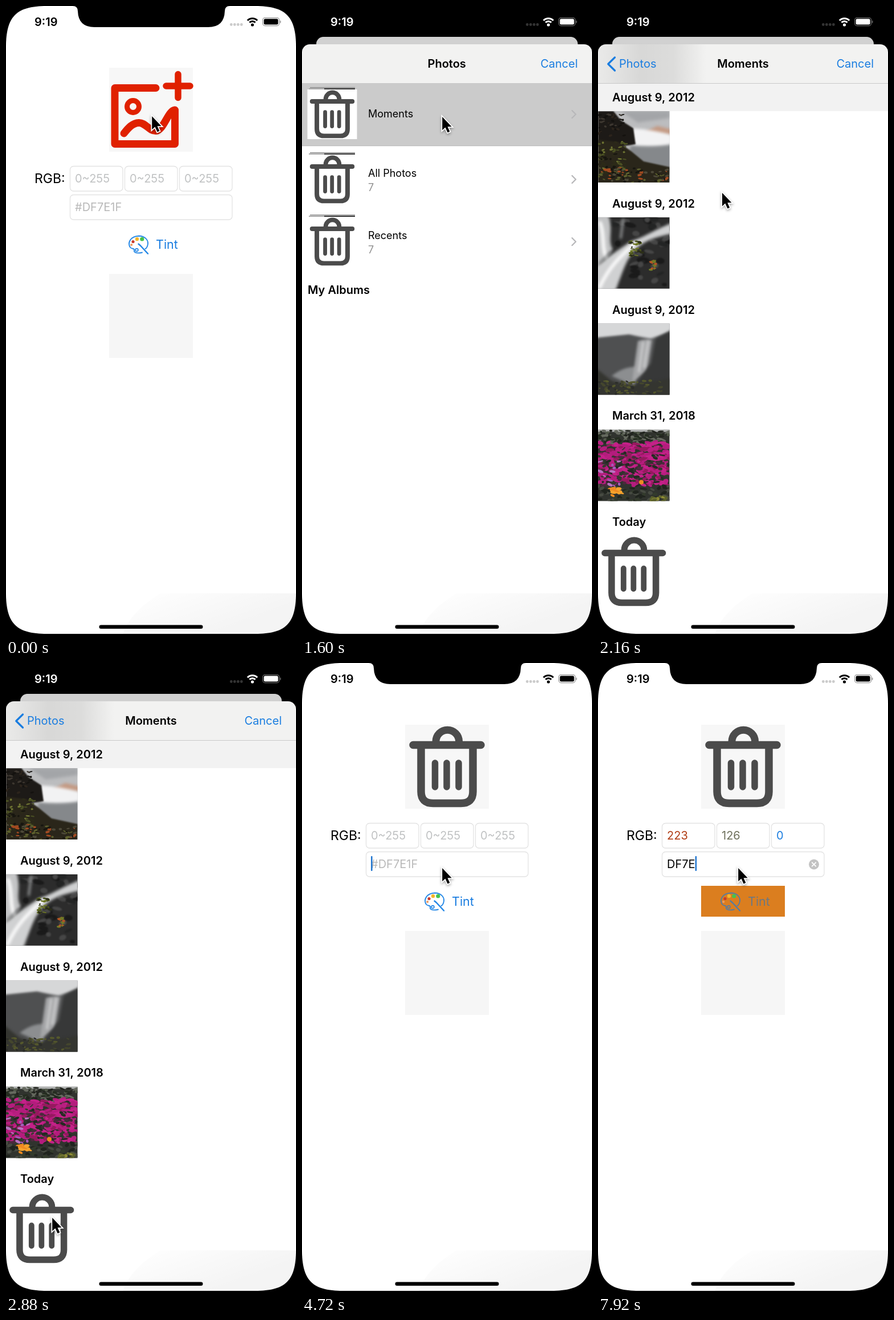
Recreate the animation shown at these times as an HTML page with a canvas. Size 509 by 1101 pixels, loop 8 s.

```html
<!DOCTYPE html>
<html lang="en">
<head>
<meta charset="utf-8">
<title>Tint picker</title>
<style>
html, body { margin: 0; width: 100%; height: 100%; overflow: hidden; background: #000; }
canvas { display: block; width: 509px; height: 1101px; }
</style>
</head>
<body>
<canvas id="stage"></canvas>
<script>
const W = 509, H = 1101, LOOP = 8000, STEP = 80;
const BLUE = '#1a7de0', INK = '#4b4b4b';
const OPEN = 240, PRESS = 1520, PUSH = 1655, CLOSE = 3200, FOCUS = 4560;
const KEYS = [[5440, 'D'], [6000, 'F'], [6720, '7'], [7440, 'E']];
const SHEET_TOP = 67;

const canvas = document.getElementById('stage');
const ratio = window.devicePixelRatio || 1;
canvas.width = Math.round(W * ratio);
canvas.height = Math.round(H * ratio);
const c = canvas.getContext('2d');

const clamp = v => Math.max(0, Math.min(1, v));
const mix = (a, b, k) => a + (b - a) * k;
const gray = v => `rgb(${Math.round(v)},${Math.round(v)},${Math.round(v)})`;
const smooth = v => { v = clamp(v); return v * v * (3 - 2 * v); };

function spring(ms) {
  if (ms <= 0) return 0;
  const x = ms * 0.0185, p = 1 - (1 + x) * Math.exp(-x);
  return p > 0.9985 ? 1 : p;
}

function within(x, y, draw, scale = 1) {
  c.save();
  c.translate(x, y);
  c.scale(scale, scale);
  draw();
  c.restore();
}

function box(x, y, w, h, fill, r = 0) {
  c.beginPath();
  c.roundRect(x, y, w, h, r);
  c.fillStyle = fill;
  c.fill();
}

function disc(x, y, r, fill) {
  c.beginPath();
  c.arc(x, y, r, 0, 7);
  c.fillStyle = fill;
  c.fill();
}

function line(path, color, width) {
  c.strokeStyle = color;
  c.lineWidth = width;
  c.lineCap = c.lineJoin = 'round';
  c.stroke(new Path2D(path));
}

function shape(path, fill) {
  c.fillStyle = fill;
  c.fill(new Path2D(path));
}

// y is the middle of the capital letters
function text(str, x, y, size, color = '#000', weight = 400, align = 'left') {
  c.font = `${weight} ${size}px Inter, Roboto, sans-serif`;
  c.textAlign = align;
  c.fillStyle = color;
  c.fillText(str, x, y + size * 0.364);
}

function screenPath() {
  const b = 1099, r = 72, k = 18;
  return new Path2D(`M0 ${r}C0 ${k} ${k} 0 ${r} 0H${W - r}C${W - k} 0 ${W} ${k} ${W} ${r}` +
    `V${b - r}C${W} ${b - k} ${W - k} ${b} ${W - r} ${b}H${r}C${k} ${b} 0 ${b - k} 0 ${b - r}Z`);
}

// Icons, in a 147 unit square
function trash() {
  line('M54 35V29.5A20.3 20.3 0 0 1 94.6 29.5V35', INK, 13);
  line('M14 35.5H133M28 35.5V117Q28 137.5 49 137.5H98Q119 137.5 119 117V35.5', INK, 13.5);
  line('M52.5 67V109M73 67V109M94 67V109', INK, 11.5);
}

function addPicture() {
  const red = '#e02100';
  line('M82 35.5H10V133.5H115.5V74C103 75 96 110 82 110.5C70 111 64 96 52 96.5C41 97 34 105 26 115', red, 13);
  line('M121 11.5V52.5M100 32H142', red, 11.5);
  c.beginPath();
  c.arc(42, 68, 10.5, 0, 7);
  c.strokeStyle = red;
  c.lineWidth = 9;
  c.stroke();
}

function palette(color) {
  line('M239 431.5C228 434 224 431 225 427C225.5 423.5 221 426 218 422.5' +
    'C213 415 218 403 233 402.5C245 402.5 251 411 248.5 419Q247 424 244.5 425', color, 1.9);
  disc(230, 408, 3.2, '#f4b62d');
  disc(238.8, 408, 3.6, '#47c34b');
  disc(223, 412.5, 2.6, '#c93a2b');
  disc(220.2, 418, 2.1, '#ee9a62');
  line('M232.5 416.5L236 419.5L249 433.5', color, 2.5);
  c.beginPath();
  c.arc(229.5, 427, 2.4, 0, 7);
  c.lineWidth = 1.7;
  c.stroke();
}

// Photos, in a 125 unit square
function random(seed) {
  return () => {
    seed = (seed + 0x6d2b79f5) | 0;
    let v = Math.imul(seed ^ seed >>> 15, 1 | seed);
    v = v + Math.imul(v ^ v >>> 7, 61 | v) ^ v;
    return ((v ^ v >>> 14) >>> 0) / 4294967296;
  };
}

function specks(seed, n, colors, x, y, w, h, r) {
  const rnd = random(seed);
  for (let i = 0; i < n; i++) {
    c.beginPath();
    c.ellipse(x + rnd() * w, y + rnd() * h, r * (0.5 + rnd()), r * (0.3 + rnd() * 0.4), rnd() - 0.5, 0, 7);
    c.fillStyle = colors[Math.floor(rnd() * colors.length)];
    c.fill();
  }
}

function soft(radius, draw) {
  c.filter = `blur(${radius * ratio}px)`;
  draw();
  c.filter = 'none';
}

const photos = [
  () => {
    box(0, 0, 126, 126, '#bcbdbf');
    soft(2.5, () => {
      shape('M40 0H126V12L70 20Z', '#a3a5a8');
      shape('M84 36L104 26L130 32V42H84Z', '#c39a84');
      shape('M60 30Q95 32 130 42V62H60Z', '#f2f2f3');
      shape('M58 60Q95 65 130 58V110H40Z', '#85888b');
    });
    soft(1, () => {
      shape('M0 0H27L40 16L62 30L66 58L40 62H0Z', '#1d1a17');
      shape('M0 50L36 54L58 70L80 88L126 98V126H0Z', '#2a261a');
    });
    specks(17, 35, ['#3d3730', '#14120f', '#2c241c'], 0, 4, 46, 42, 3);
    specks(7, 90, ['#6f7533', '#4b5123', '#17160f', '#2c2a18'], 0, 54, 50, 55, 3);
    specks(29, 80, ['#a34a20', '#5d602d', '#171610', '#4c4838'], 0, 99, 122, 26, 3);
  },
  () => {
    box(0, 0, 126, 126, '#2c2c2c');
    soft(1, () => specks(11, 50, ['#464646', '#1a1a1a', '#232424'], 20, 2, 105, 118, 8));
    soft(2.5, () => {
      shape('M-4 -4H18C28 22 16 40 26 56L-4 90Z', '#c4c5c6');
      shape('M130 10V29C92 36 76 45 60 62C46 82 40 106 30 130H-4V86C24 64 44 52 58 42C84 34 98 22 130 10Z', '#d0d1d2');
      line('M3 122C18 90 38 68 64 47M4 10C12 30 6 52 14 70', '#fafafa', 6);
      line('M44 4L40 36M3 80L22 62', '#8f9192', 4);
    });
    specks(23, 28, ['#6c7624', '#4a531e', '#2b2e18'], 56, 40, 22, 28, 3);
    specks(5, 12, ['#b65624', '#717a26'], 90, 76, 13, 18, 3);
  },
  () => {
    box(0, 0, 126, 126, '#58595a');
    soft(2, () => {
      shape('M-4 -4H130V14L92 27L55 20L-4 26Z', '#d6d7d8');
      shape('M-4 27L54 21L82 29L68 90L26 104L-4 84Z', '#4f5051');
      shape('M24 92Q46 74 72 76L64 110Z', '#8c8e90');
      shape('M70 31Q82 26 95 29L86 84L60 102Z', '#a5a6a8');
      line('M79 34L72 84M88 32L81 76', '#c9cacb', 4);
      shape('M130 11L101 27L93 70L67 104V130H130Z', '#373838');
      shape('M-4 78L25 101L62 108L130 96V130H-4Z', '#343530');
    });
    specks(13, 70, ['#55582c', '#2b2c28', '#44462d'], 0, 100, 112, 24, 3);
  },
  () => {
    box(0, 0, 126, 126, '#30332e');
    box(0, 0, 126, 4, '#b0b2b1');
    specks(3, 120, ['#252d21', '#525a4a', '#666a60', '#22251f'], 0, 2, 125, 24, 4);
    specks(19, 260, ['#b41c7d', '#c42188', '#96195f', '#b81f80'], 0, 22, 124, 76, 6);
    specks(31, 75, ['#333b2c', '#252923', '#4a2a3c'], 0, 40, 125, 62, 4);
    specks(37, 60, ['#333b2c', '#20241e', '#474b42'], 0, 98, 125, 27, 5);
    specks(43, 12, ['#a35cb8', '#b972c2'], 2, 53, 37, 48, 4);
    specks(47, 15, ['#f08b20', '#f6a32c'], 22, 102, 23, 14, 5);
    disc(76, 92, 4, '#ec8b22');
    specks(53, 15, ['#8e8c36', '#5b612c'], 92, 118, 32, 7, 4);
  }
];

function drawHome(t) {
  const typed = KEYS.filter(k => t >= k[0]).map(k => k[1]).join('');
  const rgb = [0, 2, 4].map(i => parseInt(typed.slice(i, i + 2), 16) || 0);
  const hint = '#c0c2c3';

  box(0, 0, W, H, '#fff');
  box(181, 108, 147, 147, '#f7f7f7');
  within(181, 108, t < CLOSE ? addPicture : trash);
  box(181, 469, 147, 147, '#f6f6f6');

  text('RGB:', 50, 302, 23);
  const field = (x, y, w) => {
    c.beginPath();
    c.roundRect(x + 0.5, y + 0.5, w - 1, 43.5, 6);
    c.strokeStyle = '#e3e3e3';
    c.lineWidth = 1.3;
    c.stroke();
  };
  ['#b03c14', '#6e705b', BLUE].forEach((color, i) => {
    const x = 112 + i * 96;
    field(x, 280, 93.5);
    text(typed ? String(rgb[i]) : '0~255', x + 9, 301.5, 20, typed ? color : hint);
  });

  field(112, 330, 285.5);
  text(typed || '#DF7E1F', 121, 352, 20, typed ? '#000' : '#b9b9b9');
  if (t >= FOCUS) {
    const last = KEYS.reduce((m, k) => t >= k[0] ? k[0] : m, FOCUS);
    const x = typed ? 121 + c.measureText(typed).width : 121;
    if ((t - last) % 1000 < 560) box(x, 338, 2.6, 26, '#2478d0', 1);
  }
  if (typed) {
    disc(379, 352.5, 9, '#c3c3c3');
    line('M375.8 349.3L382.2 355.7M382.2 349.3L375.8 355.7', '#fff', 1.8);
    box(181, 390, 147, 54, `rgb(${Math.max(0, rgb[0] - 4)},${rgb[1]},31)`);
  }
  palette(typed ? '#587c9e' : '#2387e6');
  text('Tint', 263, 417.5, 21.5, typed ? '#6e7880' : BLUE);
}

function drawList(pressed, q) {
  box(0, 68, W, H, '#fff');
  if (pressed) box(0, 68, W, 110, gray(mix(203, 223, q)));
  box(0, 177.3, W, 1, pressed ? '#b9b9b9' : '#d9d9d9');
  [['Moments', 79, 121], ['All Photos', 193, 225, '7'], ['Recents', 302, 334, '7']]
    .forEach(([name, top, mid, count]) => {
      box(9.5, top, 87, 87, '#fff');
      box(14, top - 4, 79, 1.5, '#8d8d8d');
      box(12, top - 2, 81, 2, '#aaa');
      box(39, top - 2, 54, 2, '#333');
      within(9.5, top, trash, 87 / 147);
      text(name, 116, mid, 18);
      if (count) text(count, 116, mid + 25, 18, '#929292');
      const y = top + 43.5;
      line(`M474 ${y - 6.5}L480.5 ${y}L474 ${y + 6.5}`, '#b8b8ba', 2.3);
    });
  text('My Albums', 10, 430, 20, '#000', 600);
}

function drawMoments() {
  const dates = ['August 9, 2012', 'August 9, 2012', 'August 9, 2012', 'March 31, 2018', 'Today'];
  box(0, 68, W, H, '#fff');
  box(0, 68, W, 49, '#f2f2f2');
  dates.forEach((date, i) => {
    const y = 117 + i * 185.8;
    text(date, 25, y - 24.3, 20, '#000', 600);
    if (!photos[i]) return within(0, y, trash, 125.5 / 147);
    within(0, y, () => {
      c.beginPath();
      c.rect(0, 0, 125.5, 125);
      c.clip();
      photos[i]();
    });
  });
}

function faded(alpha, draw) {
  c.globalAlpha = alpha;
  draw();
  c.globalAlpha = 1;
}

function drawBar(q) {
  box(0, 0, W, 68, '#f2f2f1');
  if (q > 0) within(W * (1 - q), 0, () => {
    const g = c.createLinearGradient(-40, 0, 190, 0);
    [[0, 0], [0.25, 0.05], [0.5, 0.11], [0.75, 0.09], [1, 0]]
      .forEach(([at, a]) => g.addColorStop(at, `rgba(0,0,0,${a})`));
    box(-40, 0, 230, 68, g);
  });
  box(0, 68, W, 1, '#c9c9c9');
  text('Cancel', 484, 34, 20, BLUE, 400, 'right');
  if (q < 1) faded(1 - q, () => text('Photos', mix(220.5, 37, q), 34, 20, '#000', 600));
  if (q > 0) faded(q, () => {
    text('Photos', mix(240, 37, q), 34, 20, BLUE);
    text('Moments', 254.5 + 232 * (1 - q), 34, 20, '#000', 600, 'center');
  });
  if (q > 0) faded(clamp(q * 1.2), () => line('M29.5 23L17.8 34.5L29.5 46', BLUE, 3.3));
}

function drawSheet(t, top) {
  const q = spring(t - PUSH);
  within(0, top, () => {
    c.beginPath();
    c.roundRect(0, 0, W, H, [14, 14, 0, 0]);
    c.clip();
    if (q < 1) {
      within(-0.3 * W * q, 0, () => drawList(t >= PRESS, q));
      if (q > 0) box(0, 68, W, H, `rgba(0,0,0,${0.11 * q})`);
    }
    if (q > 0) within(W * (1 - q), 0, drawMoments);
    drawBar(q);
  });
}

function drawStatus(k) {
  const ink = gray(255 * k);
  text('9:19', 50, 28, 20, ink, 600);
  const dot = gray(mix(203, 52, clamp(k * 1.7)));
  for (let i = 0; i < 4; i++) disc(395.3 + i * 6, 32.5, 2.4, dot);
  disc(432.5, 33, 2.6, ink);
  c.strokeStyle = ink;
  c.lineWidth = 3;
  c.lineCap = 'butt';
  [7.2, 12.2].forEach(r => {
    c.beginPath();
    c.arc(432.5, 34, r, -Math.PI * 0.75, -Math.PI * 0.25);
    c.stroke();
  });
  const rim = gray(mix(150, 105, k));
  c.beginPath();
  c.roundRect(450.6, 20.6, 29, 14, 4);
  c.strokeStyle = rim;
  c.lineWidth = 1.2;
  c.stroke();
  box(452.6, 22.6, 25, 10, ink, 2.3);
  box(480.8, 25.5, 1.6, 4.5, rim, 0.8);
}

function cursorAt(t) {
  const stops = [[0, 255, 190], [240, 245, 191], [1960, 245, 191], [2720, 80, 968], [3600, 80, 968], [4320, 245, 356]];
  let i = 0;
  while (i < stops.length - 2 && t >= stops[i + 1][0]) i++;
  const [t0, x0, y0] = stops[i], [t1, x1, y1] = stops[i + 1];
  const k = smooth((t - t0) / (t1 - t0));
  return [mix(x0, x1, k), mix(y0, y1, k)];
}

function drawCursor(x, y) {
  const arrow = new Path2D('M0 0V24L5.5 19L9.7 28.3L13.6 26.6L9.6 17.7H17Z');
  within(x + 1.2, y + 3, () => {
    c.save();
    c.shadowColor = 'rgba(0,0,0,.35)';
    c.shadowBlur = 4 * ratio;
    c.shadowOffsetY = 2 * ratio;
    c.strokeStyle = '#fff';
    c.lineWidth = 3.6;
    c.lineJoin = 'miter';
    c.stroke(arrow);
    c.restore();
    c.fillStyle = '#000';
    c.fill(arrow);
  }, 0.97);
}

function draw(t) {
  const p = t < CLOSE ? spring(t - OPEN) : 1 - spring(t - CLOSE);
  const tone = t < CLOSE ? clamp((t - OPEN) / 400) : 1 - clamp((t - CLOSE) / 400);

  c.setTransform(ratio, 0, 0, ratio, 0, 0);
  box(0, 0, W, H, '#000');
  c.save();
  c.clip(screenPath());
  within(25 * p, 54 * p, () => {
    if (p > 0) {
      c.beginPath();
      c.roundRect(0, 0, W, H, 14);
      c.clip();
    }
    drawHome(t);
    if (p > 0) {
      const shade = c.createLinearGradient(0, 0, 0, 95);
      shade.addColorStop(0, `rgba(0,0,0,${(p > 0.99 ? 0.18 : 0.12) * p})`);
      shade.addColorStop(1, `rgba(0,0,0,${0.2 * p})`);
      box(0, 0, W, H, shade);
    }
  }, mix(1, 459 / 509, p));
  if (p > 0) drawSheet(t, mix(H, SHEET_TOP, p));

  const glow = c.createLinearGradient(290, 1000, 330, 1110);
  glow.addColorStop(0, 'rgba(0,0,0,0)');
  glow.addColorStop(1, 'rgba(0,0,0,.045)');
  shape('M272 1028H509V1099H205Q220 1058 272 1028Z', glow);
  c.restore();

  shape('M117 0Q126 0 126 9Q127 37 155 37H355Q383 37 384 9Q384 0 393 0Z', '#000');
  drawStatus(tone);
  box(163.5, 1083.5, 182, 6.5, '#000', 3.2);
  drawCursor(...cursorAt(t));
}

const start = performance.now();
let shown = -1;
function tick() {
  const t = Math.floor(((performance.now() - start) % LOOP) / STEP) * STEP;
  if (t !== shown) draw(shown = t);
  requestAnimationFrame(tick);
}
tick();
</script>
</body>
</html>
```
